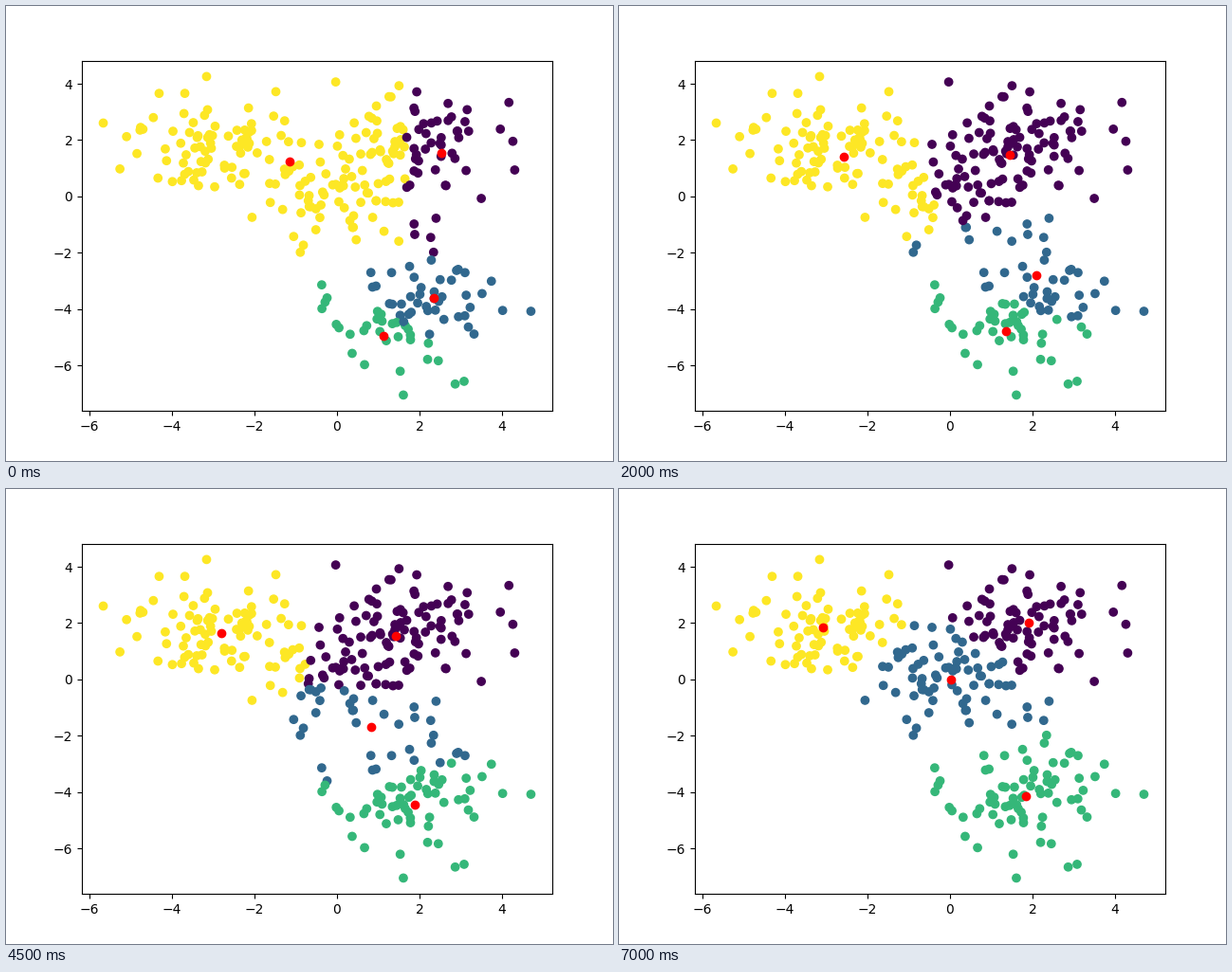
Animation, 640 px wide and 480 px high, one loop 8000 ms. Source, as a matplotlib script:

```python
import matplotlib.pyplot as plt
import numpy as np
from matplotlib.animation import FuncAnimation

FRAMES = 16
INTERVAL = 500


def make_blobs(means, per_blob, seed):
    """Gaussian clouds of unit spread, shuffled into one array."""
    rng = np.random.RandomState(seed)
    points = np.vstack([rng.normal(m, 1.0, (per_blob, 2)) for m in means])
    order = np.arange(len(points))
    rng.shuffle(order)
    return points[order]


def assign(points, centers):
    """Index of the nearest center for each point."""
    gaps = points[:, None, :] - centers[None, :, :]
    return np.argmin((gaps ** 2).sum(axis=2), axis=1)


def lloyd(points, centers, count):
    """Labels and updated centers for each k-means step."""
    steps = []
    for _ in range(count):
        labels = assign(points, centers)
        centers = np.array([points[labels == k].mean(axis=0)
                            for k in range(len(centers))])
        steps.append((labels, centers))
    return steps


points = make_blobs([(0, 0), (2, 2), (-3, 2), (2, -4)], 75, seed=0)
start = np.array([(2.3, 0.5), (2.3, -4.74), (1.939, -5.141), (1.036, 0.5)])
steps = lloyd(points, start, FRAMES)

fig, ax = plt.subplots(figsize=(6.4, 4.8), dpi=100)
labels, centers = steps[0]
cloud = ax.scatter(points[:, 0], points[:, 1], c=labels,
                   cmap="viridis", vmin=0, vmax=3)
marks = ax.scatter(centers[:, 0], centers[:, 1], c="red")


def draw(i):
    labels, centers = steps[i % FRAMES]
    cloud.set_array(labels)
    marks.set_offsets(centers)
    return cloud, marks


anim = FuncAnimation(fig, draw, frames=FRAMES, interval=INTERVAL,
                     repeat=True, repeat_delay=0, blit=False)
plt.show()
```
